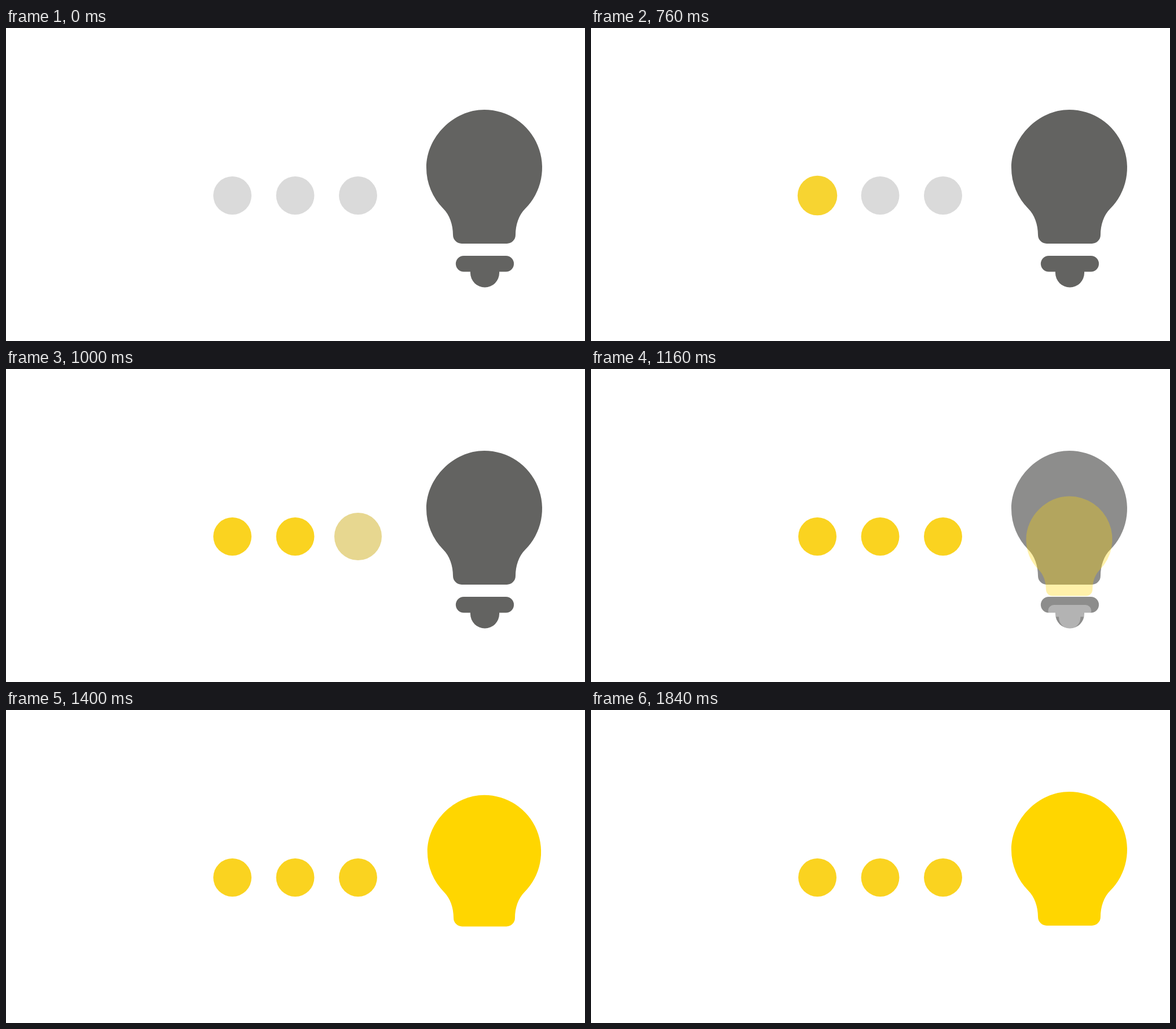
Animation of 1000x540 px, one loop 4000 ms. Source, as an HTML page with a canvas:

```html
<!DOCTYPE html>
<html lang="en">
<head>
<meta charset="utf-8">
<title>Light bulb</title>
<style>
  html, body { margin: 0; width: 100%; height: 100%; overflow: hidden; background: #fff; }
  canvas { display: block; width: 1000px; height: 540px; }
</style>
</head>
<body>
<canvas width="1000" height="540"></canvas>
<script>
const ctx = document.querySelector('canvas').getContext('2d');
const LOOP = 4000, STEP = 40;
const GREY = [218, 218, 218], GOLD = [250, 211, 32];
const DARK = '#636361', YELLOW = '#ffd600';

// The upper left of the glass is slightly flatter than a circle.
const glass = new Path2D(`M787 372 A15 15 0 0 1 772 357 C772 339 766 322.5 755.3 311.7
  A100 100 0 0 1 726 241 C726 188 773 141 826 141
  A100 100 0 0 1 896.7 311.7 C886 322.5 880 339 880 357 A15 15 0 0 1 865 372 Z`);
const base = new Path2D(`M790.5 393 H863.5 A13.7 13.7 0 0 1 863.5 420.4 H852 V422.5
  A25 25 0 0 1 802 422.5 V420.4 H790.5 A13.7 13.7 0 0 1 790.5 393 Z`);

const clamp = x => Math.min(1, Math.max(0, x));
const progress = (t, from, to) => clamp((t - from) / (to - from));

function drawDot(x, t) {
  const rise = progress(t, 0, 80);
  const rest = (1 - progress(t, 80, 200)) ** 1.7;
  const tint = 0.4 * rise ** 0.7 + 0.6 * (1 - rest);
  const color = GREY.map((c, i) => Math.round(c + (GOLD[i] - c) * tint));
  ctx.fillStyle = `rgb(${color})`;
  ctx.beginPath();
  ctx.arc(x, 289, 33 + 8 * rise * rest, 0, 2 * Math.PI);
  ctx.fill();
}

function drawRays(t) {
  const outer = 100 + 69 * Math.sin(Math.PI * progress(t, 1420, 1820));
  if (outer < 101) return;
  ctx.strokeStyle = YELLOW;
  ctx.lineWidth = 10;
  ctx.lineCap = 'round';
  ctx.beginPath();
  for (let i = -5; i <= 1; i++) {
    const a = i * Math.PI / 4, x = Math.cos(a), y = Math.sin(a);
    ctx.moveTo(825 + x * (outer - 40), 241 + y * (outer - 40));
    ctx.lineTo(825 + x * (outer - 5), 241 + y * (outer - 5));
  }
  ctx.stroke();
}

function drawBulb(alpha, scale, glassColor, baseColor) {
  ctx.save();
  ctx.globalAlpha = alpha;
  ctx.translate(826, 448);
  ctx.scale(scale, scale);
  ctx.translate(-826, -448);
  ctx.fillStyle = glassColor;
  ctx.fill(glass);
  ctx.fillStyle = baseColor;
  ctx.fill(base);
  ctx.restore();
}

function draw(t) {
  ctx.fillStyle = '#fff';
  ctx.fillRect(0, 0, 1000, 540);
  [391, 499.5, 608].forEach((x, i) => drawDot(x, t - 600 - 160 * i));
  drawRays(t);
  drawBulb(1 - progress(t, 1100, 1320), 1, DARK, DARK);
  const scale = 1 - 0.322 * (1 - progress(t, 1120, 1488)) ** 2;
  drawBulb(progress(t, 1100, 1280), scale, YELLOW, '#fff');
}

function tick() {
  draw(Math.floor(performance.now() % LOOP / STEP) * STEP);
  requestAnimationFrame(tick);
}
tick();
</script>
</body>
</html>
```
